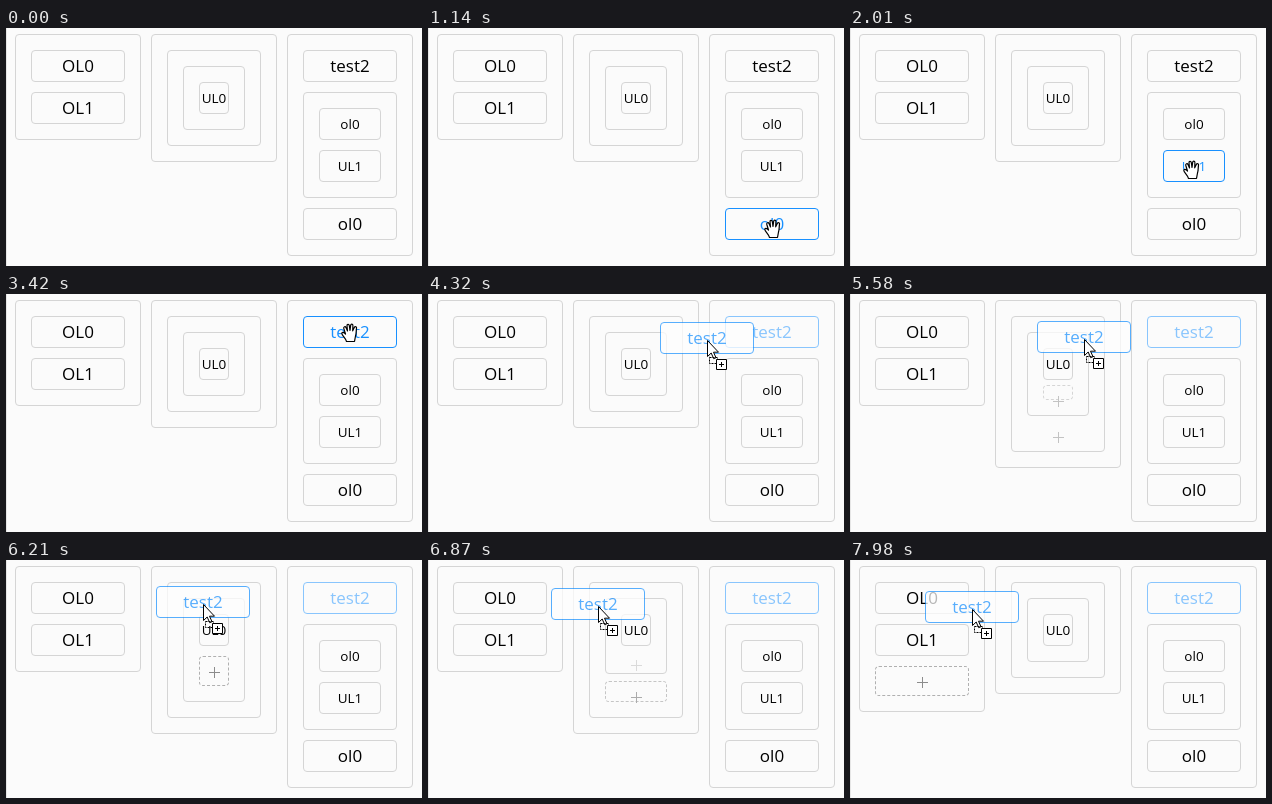
An HTML page for the animation above (8 s loop, 416 by 238 pixels).

```html
<!DOCTYPE html>
<html lang="en">
<head>
<meta charset="utf-8">
<title>Nested drag lists</title>
<style>
:root { --line: #d5d5d5; --blue: #1890ff; --dash: #b0b0b0; }
* { box-sizing: border-box; }
html, body { margin: 0; width: 100%; height: 100%; overflow: hidden; }
body { position: relative; background: #fbfbfb; border-left: 1px solid #e6e6e6; font: 17px/30px "Open Sans", "Noto Sans", sans-serif; color: #000; }
.stage { position: absolute; left: -1px; top: 0; width: 416px; height: 238px; overflow: hidden; }

.list, .item { border: 1px solid var(--line); border-radius: 4px; }
.list { padding: 15px; }
.list > * + * { margin-top: 10px; }
.col { position: absolute; top: 6px; width: 126px; }
.item { height: 32px; text-align: center; white-space: nowrap; }
.small { font-size: 13.5px; }

/* drop slots */
.list > .slot { position: relative; height: 0; margin-top: 0; opacity: 0; color: transparent; animation: 8s linear infinite; }
.slot::before { content: ""; position: absolute; inset: 0; border: 1px dashed; border-radius: 4px; }
.slot::after {
  content: ""; position: absolute; left: calc(50% - 5px); top: 11px; width: 11px; height: 11px;
  background: linear-gradient(#8c8c8c, #8c8c8c) 50% / 1px 100% no-repeat, linear-gradient(#8c8c8c, #8c8c8c) 50% / 100% 1px no-repeat;
}
.list > .s-left { animation-name: slot-left; }
.list > .s-outer { animation-name: slot-outer; }
.list > .s-mid { animation-name: slot-mid; }
.list > .s-inner { animation-name: slot-inner; }
@keyframes slot-left {
  0%, 97% { height: 0; margin-top: 0; opacity: 0; color: transparent; }
  97.01% { color: var(--dash); }
  99.5%, 100% { height: 30px; margin-top: 10px; opacity: 1; color: var(--dash); }
}
@keyframes slot-outer {
  0%, 54.62%, 63.25%, 88.5%, 99.5%, 100% { height: 0; margin-top: 0; opacity: 0; color: transparent; }
  54.63%, 88.51% { color: var(--dash); }
  57.12%, 60.75%, 91%, 97% { height: 30px; margin-top: 10px; opacity: 1; color: var(--dash); }
  60.76%, 97.01% { color: transparent; }
}
@keyframes slot-mid {
  0%, 60.75%, 71%, 84.12%, 91%, 100% { height: 0; margin-top: 0; opacity: 0; color: transparent; }
  60.76%, 84.13% { color: var(--dash); }
  63.25%, 68.5%, 86.62%, 88.5% { height: 30px; margin-top: 10px; opacity: 1; color: var(--dash); }
  68.51%, 88.51% { color: transparent; }
}
@keyframes slot-inner {
  0%, 68.5%, 86.62%, 100% { height: 0; margin-top: 0; opacity: 0; color: transparent; }
  68.51% { color: var(--dash); }
  71%, 84.12% { height: 30px; margin-top: 10px; opacity: 1; color: var(--dash); }
  84.13% { color: transparent; }
}

/* hover states */
.h-last { animation: hover-last 8s step-end infinite; }
.h-ul { animation: hover-ul 8s step-end infinite; }
.h-ol { animation: hover-ol 8s step-end infinite; }
.h-test { animation: hover-test 8s step-end infinite; }
@keyframes hover-last {
  0%, 18.45%, 100% { color: #000; border-color: var(--line); }
  7.78% { color: var(--blue); border-color: var(--blue); }
}
@keyframes hover-ul {
  0%, 29.74%, 100% { color: #000; border-color: var(--line); }
  23.4% { color: var(--blue); border-color: var(--blue); }
}
@keyframes hover-ol {
  0%, 37.4%, 100% { color: #000; border-color: var(--line); }
  31.93% { color: var(--blue); border-color: var(--blue); }
}
@keyframes hover-test {
  0% { color: #000; border-color: var(--line); opacity: 1; }
  40.9% { color: var(--blue); border-color: var(--blue); opacity: 1; }
  48.7%, 100% { color: var(--blue); border-color: var(--blue); opacity: .5; }
}

/* pointer, carrying the dragged item */
.pointer { position: absolute; width: 0; height: 0; animation: move 8s linear infinite; }
.pointer > * { position: absolute; }
.pointer svg { overflow: visible; }
.ghost { left: -47px; top: -18px; width: 94px; color: var(--blue); border-color: var(--blue); background: #fff; animation: ghost 8s step-end infinite; }
.hand { left: -9px; top: -11px; animation: hand 8s step-end infinite; }
.arrow { left: 0; top: 0; animation: arrow 8s step-end infinite; }
.badge { left: 0; top: 0; animation: badge 8s step-end infinite; }
@keyframes ghost { 0% { opacity: 0; } 48.7%, 100% { opacity: .72; } }
@keyframes badge { 0% { opacity: 0; } 48.7%, 100% { opacity: 1; } }
@keyframes hand {
  0%, 18.45%, 29.74%, 37.4%, 48.7%, 100% { opacity: 0; }
  7.78%, 23.4%, 31.93%, 40.9% { opacity: 1; }
}
@keyframes arrow {
  0%, 7.78%, 23.4%, 31.93%, 40.9% { opacity: 0; }
  5.25%, 18.45%, 29.74%, 37.4%, 48.7%, 100% { opacity: 1; }
}
@keyframes move {
  0%, 5.25% { left: 420px; top: 242px; }
  8.63%, 14.25% { left: 345px; top: 202px; }
  24%, 24.38% { left: 342px; top: 151px; }
  25.13% { left: 342px; top: 143px; }
  34.13%, 34.5% { left: 343px; top: 102px; }
  42.75%, 48.38% { left: 344px; top: 40px; }
  54% { left: 279px; top: 46px; }
  54.62% { left: 271px; top: 46px; }
  57%, 59.25% { left: 264px; top: 46px; }
  63.75%, 65.63% { left: 249px; top: 46px; }
  69.75% { left: 234px; top: 45px; }
  75.38%, 75.75% { left: 206px; top: 44px; }
  79.5%, 81.38% { left: 188px; top: 44px; }
  85.88% { left: 170px; top: 46px; }
  91.13%, 93.38% { left: 152px; top: 46px; }
  99.75%, 100% { left: 122px; top: 49px; }
}
</style>
</head>
<body>
<div class="stage">
  <div class="list col" style="left:9px">
    <div class="item">OL0</div>
    <div class="item">OL1</div>
    <div class="slot s-left"></div>
  </div>

  <div class="list col" style="left:145px">
    <div class="list">
      <div class="list">
        <div class="item small">UL0</div>
        <div class="slot s-inner"></div>
      </div>
      <div class="slot s-mid"></div>
    </div>
    <div class="slot s-outer"></div>
  </div>

  <div class="list col" style="left:281px">
    <div class="item h-test">test2</div>
    <div class="list">
      <div class="item small h-ol">ol0</div>
      <div class="item small h-ul">UL1</div>
    </div>
    <div class="item h-last">ol0</div>
  </div>

  <div class="pointer">
    <div class="item ghost">test2</div>
    <svg class="hand" width="18" height="20" fill="#fff" stroke="#000" stroke-linejoin="round">
      <path d="M5.5 18.5C4.5 15 1 12.500 .8 10.500C.8 9 2.500 9 3.500 10L4.500 11L2.800 5.500C2.300 3.600 4.400 3 5 4.600L6.500 8L6 2.800C5.900 1 8 .8 8.300 2.500L9 7.500L9.700 2.200C10 .6 12 .9 11.900 2.600L11.700 7.800L13.300 4.500C14 3 16 3.600 15.500 5.300C15 8 15.500 10 14.500 13L13.500 18.500Z" stroke-width="1.2"/>
    </svg>
    <svg class="arrow" width="13" height="20" fill="#fff" stroke="#000">
      <path d="M.5.5V16.500L4.200 13L6.700 18.700L9 17.700L6.500 12.200H11.500Z"/>
    </svg>
    <svg class="badge" width="22" height="32" fill="#fff" stroke="#000">
      <path d="M2.500 17.500H10.500V23.500H2.500Z" fill="none" stroke-dasharray="2 1"/>
      <path d="M9.500 19.500H19.500V29.500H9.500Z"/>
      <path d="M14.500 22V27M12 24.500H17"/>
    </svg>
  </div>
</div>
</body>
</html>
```
